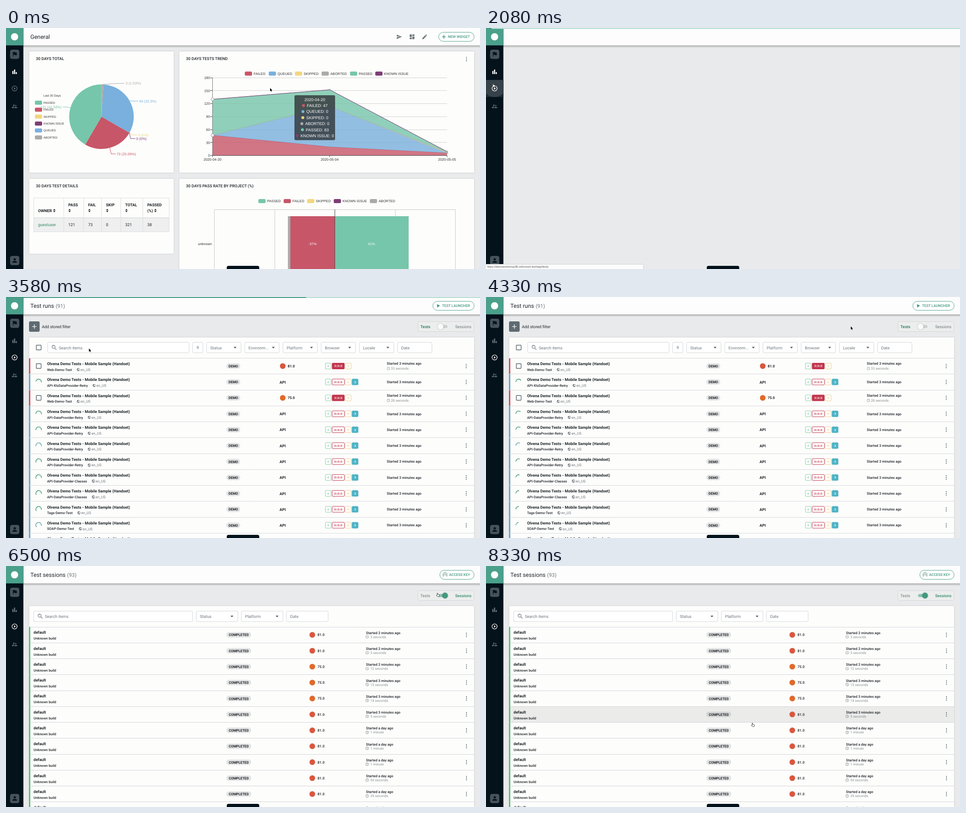
Animation of 1050x534 px, one loop 8.41 s. Source, as an HTML page with a canvas:

```html
<!DOCTYPE html>
<html lang="en">
<head>
<meta charset="utf-8">
<title>Test dashboard</title>
<style>
html, body { margin: 0; width: 100%; height: 100%; overflow: hidden; background: #e9eaeb; }
canvas { display: block; width: 1050px; height: 534px; }
</style>
</head>
<body>
<canvas id="stage" width="1050" height="534"></canvas>
<script>
const c = document.getElementById('stage').getContext('2d');
c.textRendering = 'geometricPrecision';
const LOOP = 8410;
const UI = 'Roboto, sans-serif', CHART = '"Liberation Sans", Arial, sans-serif';
const INK = '#1f2428', GREY = '#6d757b', LINE = '#dcdde0', GREEN = '#42987f', DARK = '#04121c', CARD = '#fdfdfc';
const COLOR = {
  PASSED: '#76c6ab', FAILED: '#c75668', SKIPPED: '#f2d77f',
  'KNOWN ISSUE': '#7e3d75', QUEUED: '#79b0dd', ABORTED: '#aaaaaa'
};
const ICON = {
  send: 'M2 21l21-9L2 3v7l15 2-15 2z',
  board: 'M3 13h8V3H3zM3 21h8v-6H3zM13 21h8V11h-8zM13 3v6h8V3z',
  edit: 'M3 17.2V21h3.8L17.8 9.9l-3.7-3.7zM20.7 7a1 1 0 0 0 0-1.4l-2.3-2.3a1 1 0 0 0-1.4 0l-1.9 1.8 3.8 3.8z',
  flag: 'M14.4 6L14 4H5v17h2v-7h5.6l.4 2h7V6z',
  bars: 'M4 9h4v11H4zM16 13h4v7h-4zM10 4h4v16h-4z',
  run: 'M10 16.5l6-4.5-6-4.5zM12 2a10 10 0 1 0 0 20 10 10 0 0 0 0-20zm0 18a8 8 0 1 1 0-16 8 8 0 0 1 0 16z',
  people: 'M16.5 12a2.5 2.5 0 1 0 0-5 2.5 2.5 0 0 0 0 5zM9 11a3 3 0 1 0 0-6 3 3 0 0 0 0 6zM16.5 14c-1.8 0-5.5.9-5.5 2.7V19h11v-2.3c0-1.8-3.7-2.7-5.5-2.7zM9 13c-2.3 0-7 1.2-7 3.5V19h7v-2.3c0-.8.3-2.3 2.4-3.4z',
  person: 'M12 12a4 4 0 1 0 0-8 4 4 0 0 0 0 8zm0 2c-2.7 0-8 1.3-8 4v2h16v-2c0-2.7-5.3-4-8-4z',
  search: 'M15.5 14h-.8l-.3-.3a6.5 6.5 0 1 0-.7.7l.3.3v.8l5 5 1.5-1.5zM9.5 14a4.5 4.5 0 1 1 0-9 4.5 4.5 0 0 1 0 9z',
  play: 'M6 3v18l15-9z',
  clock: 'M12 2a10 10 0 1 0 0 20 10 10 0 0 0 0-20zm0 18a8 8 0 1 1 0-16 8 8 0 0 1 0 16zM11 7h1.5v5.2l4.5 2.7-.8 1.2L11 13z',
  globe: 'M12 2a10 10 0 1 0 0 20 10 10 0 0 0 0-20zM11 20C7 19.5 4 16 4 12l.2-1.8L9 15v1a2 2 0 0 0 2 2zM18 17.5c-.3-.8-1-1.4-1.9-1.4h-1v-3a1 1 0 0 0-1-1H8v-2h2a1 1 0 0 0 1-1V7h2a2 2 0 0 0 2-2v-.4a8 8 0 0 1 3 12.9z',
  hand: 'M8 2c1.2 0 2 .8 2 2v5l8 2c1.5.4 2 1.5 1.8 3L18.5 22H9L3 15c.8-1.5 2.5-1 4 .5V4c0-1 .4-2 1-2z',
  arrow: 'M0 0v8.5l2-1.8 1.5 3 1.2-.6-1.4-2.8h2.7z'
};
for (const k in ICON) ICON[k] = new Path2D(ICON[k]);

// Drawing helpers; text y is the middle of the capitals
function text(s, x, y, size, color = INK, weight = 400, align = 'left', font = UI) {
  c.font = `${weight} ${size}px ${font}`;
  c.textAlign = align;
  c.fillStyle = color;
  c.fillText(s, x, Math.round(y + size * .36));
  return c.measureText(s).width;
}
const label = (s, x, y, size, color = '#333', align) => text(s, x, y, size, color, 400, align, CHART);
function box(x, y, w, h, fill, r = 0, stroke, width = 1) {
  c.beginPath();
  c.roundRect(x, y, w, h, r);
  if (fill) { c.fillStyle = fill; c.fill(); }
  if (stroke) { c.strokeStyle = stroke; c.lineWidth = width; c.stroke(); }
}
function line(color, width, ...p) {
  c.beginPath();
  for (let i = 0; i < p.length; i += 2) c.lineTo(p[i], p[i + 1]);
  c.strokeStyle = color; c.lineWidth = width; c.stroke();
}
const rule = (color, x1, x2, y) => line(color, 1, x1, Math.floor(y) + .5, x2, Math.floor(y) + .5);
function dot(x, y, r, fill, stroke) {
  c.beginPath(); c.arc(x, y, r, 0, 7);
  c.fillStyle = fill; c.fill();
  if (stroke) { c.strokeStyle = stroke; c.lineWidth = 1; c.stroke(); }
}
function icon(name, x, y, size, color) {
  c.save();
  c.translate(x - size / 2, y - size / 2);
  c.scale(size / 24, size / 24);
  c.fillStyle = color;
  c.fill(ICON[name], 'evenodd');
  c.restore();
}
const kebab = (x, y) => [-3.7, 0, 3.7].forEach(d => dot(x, y + d, 1.1, '#5d666c'));
function triangle(x, y, w, h) {
  c.beginPath(); c.moveTo(x - w, y); c.lineTo(x + w, y); c.lineTo(x, y + h); c.fill();
}
function card(x, y, w, h) {
  c.shadowColor = 'rgba(0,0,0,.18)'; c.shadowBlur = 3;
  box(x, y, w, h, CARD, 1);
  c.shadowColor = 'transparent';
}

// Value of keyed rows [time, ...values] at time t
function keyed(keys, t, ease = u => u) {
  const n = keys.findIndex(k => k[0] > t);
  if (n < 0) return keys[keys.length - 1].slice(1);
  if (!n) return keys[0].slice(1);
  const a = keys[n - 1], b = keys[n], u = ease((t - a[0]) / (b[0] - a[0]));
  return a.slice(1).map((v, i) => v + (b[i + 1] - v) * u);
}
const clamp = u => Math.max(0, Math.min(1, u));
const smooth = u => { u = clamp(u); return u * u * (3 - 2 * u); };
const PATH = [
  [0, 585, 133], [950, 112, 110], [1150, 112, 110], [1750, 17, 127], [3300, 17, 127],
  [4250, 808, 65], [4500, 808, 65], [5100, 957, 64], [6750, 957, 64], [8250, 591.5, 352]
];
const LOADS = [
  [[1990, 0], [2080, 12], [2830, 258], [3500, 480], [3750, 1050], [3900, 1050]],
  [[5600, 0], [6050, 400], [6300, 1050], [6420, 1050]]
];

function legend(y, items) {
  for (const [name, x] of items) {
    box(x, y - 4.5, 16, 9, COLOR[name], 2.5);
    label(name, x + 19.5, y, 7.6);
  }
}

function pie() {
  const x = 211.5, y = 196.5, r = 71.5;
  let a = -Math.PI / 2;
  for (const [name, share] of [['ABORTED', .0103], ['QUEUED', .323], ['FAILED', .2509], ['PASSED', .4158]]) {
    const b = a + share * 2 * Math.PI;
    c.beginPath(); c.moveTo(x, y); c.arc(x, y, r, a, b);
    c.fillStyle = COLOR[name]; c.fill();
    a = b;
  }
  const tag = (name, s, tx, ty, align, ...p) => {
    line(COLOR[name], 1, ...p);
    label(s, tx, ty, 7.8, COLOR[name], align);
  };
  tag('ABORTED', '3 (1.03%)', 265, 122.5, 'left', 214, 125, 244, 123, 262, 122.5);
  tag('QUEUED', '94 (32.3%)', 295, 162, 'left', 274, 161, 281, 162, 293, 162);
  tag('SKIPPED', '0 (0%)', 293, 237, 'left', 273, 232, 280, 237, 291, 237);
  tag('KNOWN ISSUE', '0 (0%)', 288.5, 245, 'left', 273, 232, 276, 245, 286.5, 245);
  tag('FAILED', '73 (25.09%)', 245, 279, 'left', 230, 266, 233, 279, 243, 279);
  tag('PASSED', '121 (41.58%)', 123, 175, 'right', 143, 177, 136, 175, 126, 175);
  label('Last 30 Days', 83, 150, 6.6);
  ['PASSED', 'FAILED', 'SKIPPED', 'KNOWN ISSUE', 'QUEUED', 'ABORTED'].forEach((name, i) => {
    const ly = 165.5 + 15.4 * i;
    box(64, ly - 4.5, 16, 9, COLOR[name], 2.5);
    label(name, 83, ly, 6.45);
  });
}

function trend(cur) {
  legend(101, [['FAILED', 529], ['QUEUED', 582], ['SKIPPED', 640], ['ABORTED', 699], ['PASSED', 762], ['KNOWN ISSUE', 818]]);
  const xs = [457.5, 717, 977], yOf = v => 282.5 - v * 172.5 / 180;
  const hover = cur[0] > 457;
  for (let v = 0; v <= 180; v += 30) {
    rule('#d2d2d4', xs[0], xs[2], yOf(v));
    rule('#444', 453, xs[0], yOf(v));
    label(v, 452, yOf(v), 7.8, '#333', 'right');
  }
  const sums = [['FAILED', 47, 20, 6], ['QUEUED', 47, 114, 6], ['SKIPPED', 47, 114, 7], ['ABORTED', 47, 114, 8], ['PASSED', 130, 152, 9], ['KNOWN ISSUE', 130, 152, 9]];
  let low = [0, 0, 0];
  for (const [name, ...vals] of sums) {
    c.beginPath();
    xs.forEach((x, i) => c.lineTo(x, yOf(vals[i])));
    for (let i = 2; i >= 0; i--) c.lineTo(xs[i], yOf(low[i]));
    c.globalAlpha = .8; c.fillStyle = COLOR[name]; c.fill(); c.globalAlpha = 1;
    line(COLOR[name], 1, ...xs.flatMap((x, i) => [x, yOf(vals[i])]));
    low = vals;
  }
  line('#444', 1, xs[0], 110, xs[0], 282.5, xs[2], 282.5);
  xs.forEach((x, i) => {
    line('#444', 1, x, 282.5, x, 286);
    label(['2020-04-20', '2020-05-04', '2020-05-05'][i], x, 291.5, 7.75, '#333', 'center');
  });
  const near = hover ? (cur[0] < 587 ? 0 : 1) : -1;
  if (hover) line('#777', 1, xs[near], 110, xs[near], 282);
  for (const vals of [sums[0], sums[1], sums[4]])
    xs.forEach((x, i) => dot(x, yOf(vals[i + 1]), i === near ? 3.2 : 1.4, '#fff', i === near ? '#999' : '#777'));
  if (hover) tooltip(cur[0] + 54, cur[1] + 16);
}

function tooltip(x, y) {
  box(x, y, 90, 99.5, 'rgba(50,55,58,.82)', 3);
  label('2020-04-20', x + 45, y + 9.5, 9, '#fff', 'center');
  [['FAILED', 47], ['QUEUED', 0], ['SKIPPED', 0], ['ABORTED', 0], ['PASSED', 83], ['KNOWN ISSUE', 0]].forEach(([name, n], i) => {
    const ly = y + 22.8 + 13.4 * i;
    const w = label(`${name}: ${n}`, x + 50.5, ly, 9, '#fff', 'center');
    dot(x + 43 - w / 2, ly, 3.2, COLOR[name]);
  });
}

function details() {
  const cols = [61.5, 128, 172, 211.5, 254, 303, 361.5];
  box(61, 420, 300, 31.5, '#efefef');
  box(61.5, 376.5, 300, 75, null, 0, LINE);
  line('#cfd0d2', 1, 61, 420.5, 361, 420.5);
  cols.slice(1, 6).forEach(x => line(LINE, 1, x, 376, x, 452));
  const sort = (x, y) => {
    c.fillStyle = INK;
    triangle(x, y - .8, 2.7, -3);
    triangle(x, y + .8, 2.7, 3);
  };
  text('OWNER', 71, 404.5, 8.8, INK, 700); sort(107, 404.5);
  ['PASS', 'FAIL', 'SKIP', 'TOTAL', 'PASSED'].forEach((s, i) => {
    const x = cols[i + 1] + 10;
    text(s, x, 392, 8.7, INK, 700);
    if (i === 4) text('(%)', x, 404.5, 8.7, INK, 700);
    sort(x + (i === 4 ? 18 : 2.8), 404.5);
  });
  text('guestuser', 71, 436, 9, '#2f8a64');
  ['121', '73', '0', '321', '38'].forEach((s, i) => text(s, cols[i + 1] + 10, 436, 9));
}

function rates() {
  legend(383.5, [['PASSED', 559], ['FAILED', 615], ['SKIPPED', 667], ['KNOWN ISSUE', 726], ['ABORTED', 806]]);
  rule('#c9c9cc', 461, 996, 402);
  [461.5, 595.5, 862.5, 995.5].forEach(x => line('#c9c9cc', 1, x, 402, x, 534));
  box(624.5, 417, 5.5, 120, COLOR.ABORTED);
  box(630, 417, 99, 120, COLOR.FAILED);
  box(729, 417, 163, 120, COLOR.PASSED);
  line('#444', 1, 728.5, 402, 728.5, 534);
  label('-37%', 679, 478.5, 7.7, '#fff', 'center');
  label('61%', 810, 478.5, 7.7, '#fff', 'center');
  label('unknown', 456, 478.5, 7.7, '#333', 'right');
}

function dashboard(t, cur) {
  [[51.5, 52, 320, 268.5, '30 DAYS TOTAL'], [384, 52, 653, 268.5, '30 DAYS TESTS TREND'],
   [51.5, 334, 320, 166, '30 DAYS TEST DETAILS'], [384, 334, 653, 220, '30 DAYS PASS RATE BY PROJECT (%)']]
    .forEach(([x, y, w, h, name]) => {
      card(x, y, w, h);
      text(name, x + 14.8, y + 16, 8.9, INK, 500);
      if (cur[0] > x && cur[0] < x + w && cur[1] > y && cur[1] < y + h) kebab(x + w - 17, y + 17);
    });
  pie(); details(); rates(); trend(cur);
}

function dashboardHead() {
  text('General', 54, 19.5, 12.7);
  icon('send', 871, 19.5, 13, GREY);
  icon('board', 899.5, 19.5, 14, GREY);
  icon('edit', 927.5, 19.5, 14, GREY);
  button(958, 'NEW WIDGET', 979);
  line(GREEN, 1.5, 966, 19.5, 974, 19.5);
  line(GREEN, 1.5, 970, 15.5, 970, 23.5);
}
function button(x, s, tx) {
  box(x + .5, 9.5, 1036.5 - x, 20, '#fff', 10, '#55a48d');
  text(s, tx, 19.5, 8, GREEN, 500);
}
function heading(s, n) {
  const w = text(s, 54, 19.5, 12.7);
  text(`(${n})`, 57.5 + w, 19.5, 11.5, GREY);
}

function field(x, w, s, y, drop = true) {
  box(x + .5, y - 11.5, w, 23, '#fff', 2, '#d5d7da');
  text(s, x + 8.5, y + .3, 9, GREY);
  if (drop) { c.fillStyle = '#555'; triangle(x + w - 12.5, y - 1.5, 3.2, 3.6); }
}
function searchField(x, w, y) {
  box(x + .5, y - 11.5, w, 23, '#fff', 2, '#d5d7da');
  icon('search', x + 15, y, 15, GREY);
  text('Search items', x + 25, y + .3, 9, GREY);
}
function pill(s, x, y, w, dark) {
  box(x, y - 6, w, 12, dark ? '#d2d3d3' : '#e2e3e3', 6);
  text(s, x + w / 2, y + .2, 7.6, INK, 700, 'center');
}
const checkbox = y => box(67.2, y - 5.3, 10.5, 10.5, '#fff', 1, '#596269', 1.4);
const browserMark = (x, y, version) => dot(x, y, 6.3, version === '81.0' ? '#d9573f' : '#e06a2b');

function toggle(on) {
  box(912.5, 54.5, 124, 22, '#eceeed', 3, '#d3d8d7');
  text('Tests', 918, 65.5, 8.9, on < .5 ? '#37896b' : GREY, on < .5 ? 700 : 400);
  text('Sessions', 995, 65.5, 8.9, on < .5 ? GREY : '#37896b', on < .5 ? 400 : 500);
  box(957, 62, 21, 7, on < .5 ? '#cfd1d1' : '#8fc3b2', 3.5);
  c.shadowColor = 'rgba(0,0,0,.3)'; c.shadowBlur = 2.5;
  dot(962.5 + 10 * on, 65.5, 6.4, on < .5 ? '#fafafa' : GREEN);
  c.shadowColor = 'transparent';
}

function spinner(y, t, i) {
  const p = (t - 2650 - (i - 1) * 11) / 1333, n = Math.floor(p), u = p - n;
  const head = 270 * smooth(u * 2), tail = 270 * smooth(u * 2 - 1);
  const base = -75 + .23 * (t - 2830) + 270 * n, rad = Math.PI / 180;
  c.beginPath();
  c.arc(72.3, y, 6.2, (base + tail) * rad, (base + head + 3) * rad);
  c.strokeStyle = i % 5 ? '#3b9377' : '#5a9a9c'; c.lineWidth = 1.4; c.stroke();
}

const SUITES = ['Web-Demo-Test', 'API-XlsDataProvider-Retry', 'Web-Demo-Test',
  ...Array(4).fill('API-DataProvider-Retry'), ...Array(2).fill('API-DataProvider-Classes'),
  'Tags-Demo-Test', 'SOAP-Demo-Test', 'SOAP-Demo-Test'];

function count(x, w, y, s, color, filled) {
  box(x + .5, y - 6.5, w, 13, filled ? color : '#fff', 1.5, color);
  c.letterSpacing = '.9px';
  text(s, x + 1 + w / 2, y + .2, 6.3, filled ? '#fff' : color, 700, 'center');
  c.letterSpacing = '0px';
}

function runs(t) {
  const ready = t >= 3300;
  if (ready) {
    box(51, 54, 23.5, 23, '#5f6a72', 3);
    line('#fff', 1.3, 58, 65.5, 67.5, 65.5);
    line('#fff', 1.3, 62.7, 60.8, 62.7, 70.2);
  }
  text('Add stored filter', ready ? 79.5 : 51, 65.8, 8.95);
  toggle(smooth((t - 5530) / 100));
  card(51.5, 89.5, 985.5, 460);
  checkbox(112);
  searchField(92, 313, 112);
  box(413.5, 100.5, 22.5, 23, '#fff', 2, '#d5d7da');
  text('R', 424.8, 112.3, 8.6, GREY, 400, 'center');
  const names = ready ? ['Status', 'Environm...', 'Platform', 'Browser', 'Locale', 'Date'] : ['Status', 'Date'];
  names.forEach((s, i) => field(444 + 84.6 * i, 76, s, 112, s !== 'Date'));
  SUITES.forEach((suite, i) => {
    const y = 153 + 35.27 * i, web = suite[0] === 'W';
    rule('#d6d7dc', 52, 1037, y - 17.5);
    box(51, y - 17, 2.8, 35, web ? '#cf4257' : '#5c9fd0');
    if (web) checkbox(y); else spinner(y, t, i);
    text('Olvena Demo Tests - Mobile Sample (Handset)', 91, y - 5, 8.75, INK, 700);
    const w = text(suite, 91, y + 8, 7.65, INK, 500);
    icon('globe', 105 + w, y + 8, 8, GREY);
    text('en_US', 110 + w, y + 8, 7.9, GREY);
    pill('DEMO', 488, y, 31);
    if (web) {
      const version = i ? '75.0' : '81.0';
      browserMark(613, y, version);
      text(version, 624, y, 7.9, INK, 700);
      text('Started 3 minutes ago', 843.5, y - 5.3, 7.75, INK, 500);
      icon('clock', 847, y + 5.6, 8, '#8a9095');
      text(i ? '28 seconds' : '33 seconds', 852.5, y + 5.6, 7.7, '#8a9095');
    } else {
      text('API', 606, y + .3, 8.5, INK, 700);
      text('Started 3 minutes ago', 843.5, y, 7.75, INK, 500);
      count(766, 13.5, y, '3', '#4fb3c4', true);
    }
    count(707, 12.5, y, '0', '#8cc9a6');
    count(722, 27, y, web ? '3|0|0' : '0|0|0', '#c2364d', web);
    count(751, 13, y, '0', '#e9d08c');
    kebab(1019.5, y);
  });
}

const SESSIONS = [['2 minutes', '3 seconds'], ['2 minutes', '3 seconds'], ['2 minutes', '12 seconds'],
  ['3 minutes', '15 seconds'], ['3 minutes', '14 seconds'], ['3 minutes', '5 seconds'],
  ['a day', '1 minute'], ['a day', '1 minute'], ['a day', '1 minute'],
  ['a day', '54 seconds'], ['a day', '35 seconds'], ['a day', '35 seconds']];

function sessions(t, cur) {
  const tip = cur[1] - 7;
  toggle(1);
  card(51.5, 88.5, 985.5, 460);
  searchField(61, 352, 111.5);
  ['Status', 'Platform', 'Date'].forEach((s, i) => field(421 + 100 * i, 92, s, 111.5, i < 2));
  SESSIONS.forEach(([ago, length], i) => {
    const y = 152.5 + 35.27 * i, hover = Math.abs(tip - y) < 17.6;
    if (hover) box(52, y - 17.5, 985, 35.3, '#ebebea');
    rule('#d3d4dc', 52, 1037, y - 17.5);
    box(51, y - 17.5, 2.8, 35.4, '#50bd70');
    text('default', 61, y - 5.3, 8.7, INK, 700);
    text('Unknown build', 61, y + 8, 7.6, INK, 500);
    pill('COMPLETED', 488, y, 55, hover);
    const version = i > 1 && i < 5 ? '75.0' : '81.0';
    browserMark(678.5, y, version);
    text(version, 690, y, 7.9, INK, 500);
    text(`Started ${ago} ago`, 797.5, y - 4.5, 7.7, INK, 500);
    icon('clock', 800, y + 4.5, 8, GREY);
    text(length, 807, y + 4.5, 7.7, '#8a9095');
    kebab(1020, y);
  });
}

function runsHead() {
  heading('Test runs', 91);
  button(945, 'TEST LAUNCHER', 966);
  icon('play', 957.5, 19.5, 10, GREEN);
}
function sessionsHead() {
  heading('Test sessions', 93);
  button(960.5, 'ACCESS KEY', 981.5);
  c.strokeStyle = '#9db3ac'; c.lineWidth = .8;
  for (let r = 1; r < 6.5; r += 1.3) {
    c.beginPath(); c.ellipse(972.5, 19.5, r * .85, r, 0, 2.2, 7.2); c.stroke();
  }
}

function sidebar(t, cur) {
  box(0, 0, 38.5, 534, DARK);
  box(0, 0, 38.5, 38.5, '#4ba08b');
  dot(19, 19.5, 8, '#fff');
  const over = cur[0] < 38 && cur[1] > 115 && cur[1] < 153;
  if (over) {
    box(0, 115, 38.5, 38, '#1b2931');
    if (t > 1940 && t < 2700) {
      c.save();
      c.beginPath(); c.rect(0, 115, 38.5, 38); c.clip();
      c.globalAlpha = clamp((2700 - t) / 400);
      dot(19, 127, 26 * Math.sqrt(clamp((t - 1940) / 140)), '#35424a');
      c.restore();
    }
  }
  const onTests = t >= 2500;
  box(9, 48, 20.5, 20.5, '#46525a', 4.5);
  icon('flag', 19.3, 58, 14, DARK);
  icon('bars', 19, 97, 15, onTests ? '#66737b' : '#fff');
  icon('run', 19, 134, 15, onTests || over ? '#fff' : '#66737b');
  icon('people', 19, 173.5, 14, '#5f6d75');
  box(9, 505, 20.5, 20.5, '#46525a', 4.5);
  icon('person', 19.3, 515, 15, DARK);
  if (over) {
    box(-3, 523.5, 352, 14, '#fcfcfc', 2, '#cfd0d2');
    label('https://demoworkshop38.velmorani.test/app/tests', 2.5, 529, 6.25, '#555');
  }
}

function loadBar(t) {
  const keys = LOADS.find(k => t >= k[0][0] && t < k[k.length - 1][0]);
  if (!keys) return;
  c.globalAlpha = clamp((keys[keys.length - 1][0] - t) / 120);
  box(0, 0, 1050, 2, '#b3dccf');
  box(0, 0, keyed(keys, t)[0], 2, '#3f9880');
  c.globalAlpha = 1;
}

function pointer([x, y], t) {
  const hand = x < 38 || (t > 4500 && x > 912 && y > 54 && y < 77) || (t > 5850 && y > 135);
  c.save();
  c.lineJoin = 'round';
  if (hand) {
    c.translate(x - 4.8, y - 5);
    c.scale(.4, .4);
    c.fillStyle = '#fff'; c.fill(ICON.hand);
    c.strokeStyle = '#333'; c.lineWidth = 2.2; c.stroke(ICON.hand);
  } else {
    c.translate(x, y);
    c.scale(.85, .85);
    c.strokeStyle = '#fff'; c.lineWidth = 1.4; c.stroke(ICON.arrow);
    c.fillStyle = '#000'; c.fill(ICON.arrow);
  }
  c.restore();
}

function draw(now) {
  const t = now % LOOP, cur = keyed(PATH, t, smooth);
  const page = t < 1960 ? [dashboard, dashboardHead]
    : t < 2600 ? null
    : t < 5680 ? [runs, runsHead]
    : t < 5850 ? null
    : [sessions, sessionsHead];
  box(0, 0, 1050, 534, '#e9eaeb');
  if (page) page[0](t, cur);
  const shade = c.createLinearGradient(0, 38, 0, 44);
  shade.addColorStop(0, 'rgba(0,0,0,.3)');
  shade.addColorStop(1, 'rgba(0,0,0,0)');
  box(38, 38, 1012, 6, shade);
  box(38, 0, 1012, 38.5, '#fdfdfd');
  if (page) page[1]();
  sidebar(t, cur);
  box(489, 527, 72, 14, DARK, 4);
  loadBar(t);
  pointer(cur, t);
  requestAnimationFrame(() => draw(performance.now() - start));
}
const start = performance.now();
draw(0);
</script>
</body>
</html>
```
